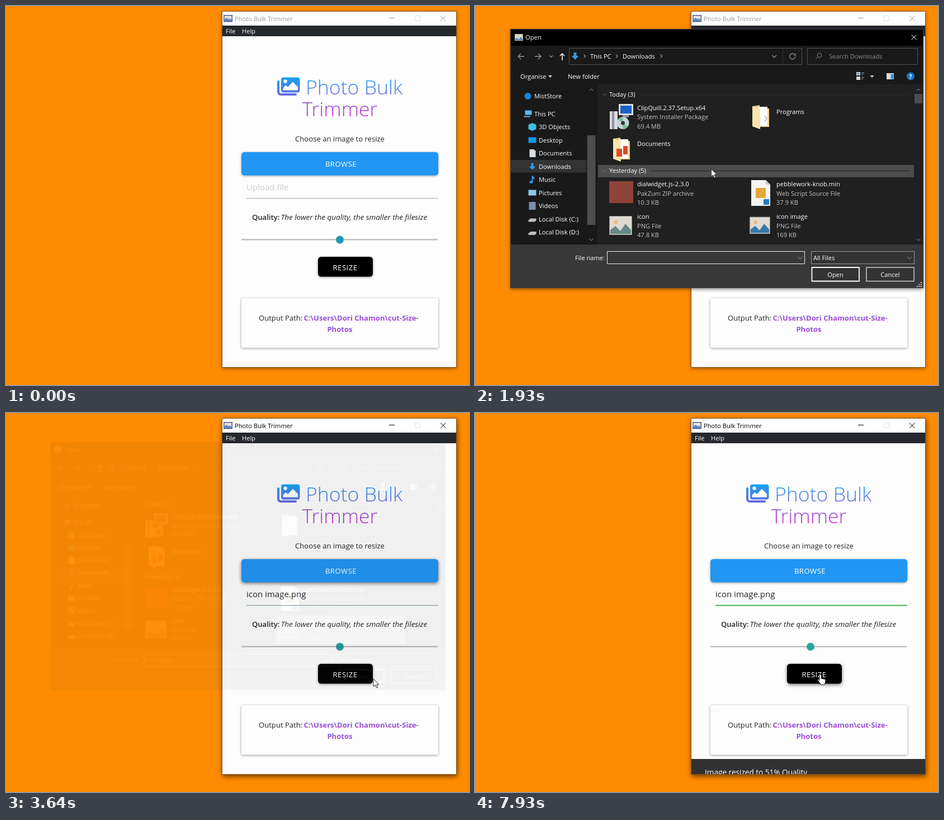
Write an HTML page that moves like this. It is 828 px wide and 677 px high and loops after 8 s.

```html
<!DOCTYPE html>
<html lang="en">
<head>
<meta charset="utf-8">
<title>Photo Bulk Trimmer</title>
<style>
html, body { margin: 0; width: 100%; height: 100%; overflow: hidden; background: #ff8c00; }
#stage { display: block; width: 828px; height: 677px; }
text { font: 11.1px "Open Sans", "Noto Sans", sans-serif; white-space: pre; }
.mid { text-anchor: middle; }
.head { font-size: 35.6px; font-weight: 300; fill: url(#titleInk); }
.body { font-size: 13.1px; fill: #212529; }
.field { font-size: 15px; }
.caps { font-size: 13.1px; letter-spacing: .5px; fill: #fff; }
.path { font-size: 13.1px; font-weight: 700; fill: url(#pathInk); }
.line { fill: none; }
.line:not([stroke]) { stroke: currentColor; }
.raised { filter: drop-shadow(0 1.5px 2px #0006); }
#dialog { transform-origin: 432.5px 272.5px; color: #ccc; }
#dialog text { fill: #fff; }
#dialog .dim { fill: #c4c4c4; }
#dialog .faint { fill: #8a8a8a; }
</style>
</head>
<body>
<svg id="stage" viewBox="0 0 828 677">
  <defs>
    <linearGradient id="titleInk" gradientUnits="userSpaceOnUse" x1="0" y1="126" x2="0" y2="200">
      <stop stop-color="#12a5f5"/><stop offset="1" stop-color="#d024c8"/>
    </linearGradient>
    <linearGradient id="pathInk" gradientUnits="userSpaceOnUse" x1="0" y1="546" x2="0" y2="566.5" spreadMethod="repeat">
      <stop stop-color="#4a8cea"/><stop offset="1" stop-color="#d020c8"/>
    </linearGradient>
    <g id="photo">
      <path fill="#8d8a85" d="M0 0h41v34H0z"/>
      <path fill="#dedad2" d="M1 1h39v32H1z"/>
      <circle cx="12" cy="11" r="3.500" fill="#eeb978"/>
      <path fill="currentColor" d="M2 32V25l9-7 9 9 9-13 10 11v7z"/>
    </g>
    <g id="folder">
      <path fill="#e6c77f" d="M0 2l13-2v40L0 37z"/>
      <path fill="#fff" d="M10 3h17v35H10z"/>
      <path fill="#fae4ae" d="M0 2l14 5v36L0 38z"/>
      <path fill="#f3d793" d="M27 6h3v33H14v-2h13z"/>
    </g>
  </defs>

  <rect width="828" height="677" fill="#ff8c00"/>

  <rect id="frame" x="386.500" y="9.500" width="419" height="636" fill="#fdfdfd" stroke="#8a5210"/>
  <path fill="#fff" d="M387 10h418v25H387z"/>
  <path fill="#25282d" d="M387 35h418v19H387z"/>
  <path fill="#4b5d8c" d="M389 16h16v12.500H389z"/>
  <path fill="#e8e2d6" d="M390.500 17.500h13v9.500h-13z"/>
  <path fill="#5b87c5" d="M390.500 27v-3l4-3 4 3 2-2 3 3v2z"/>
  <g id="caption">
    <text x="409" y="26.500" fill="currentColor">Photo Bulk Trimmer</text>
    <path class="line" d="M685 21.500h10M777 17.500l9.500 9.500m0-9.500l-9.500 9.500"/>
  </g>
  <path fill="none" stroke="#d5e3ec" d="M731.500 17.500h9v9h-9z"/>
  <text x="393" y="48.500" fill="#fff">File</text>
  <text x="422" y="48.500" fill="#fff">Help</text>

  <rect x="492" y="127.500" width="33.500" height="27" rx="4" fill="url(#titleInk)"/>
  <path fill="none" stroke="url(#titleInk)" stroke-width="4" stroke-linecap="round" d="M487 135v18q0 5 5 5h26"/>
  <circle cx="499.500" cy="134.500" r="3.200" fill="#fdfdfd"/>
  <path fill="#fdfdfd" d="M495.500 150.500v-4l5-5 3.500 3.500 9-9.500 9 9v6z"/>
  <text class="head" x="536" y="158">Photo Bulk</text>
  <text class="head mid" x="597" y="197">Trimmer</text>
  <text class="body mid" x="597" y="242">Choose an image to resize</text>

  <rect id="browse" class="raised" x="421" y="261" width="352" height="41.500" rx="5.500" fill="#2196f3"/>
  <text class="caps mid" x="599" y="287">BROWSE</text>
  <text id="hint" class="field" x="430" y="329" fill="#c9ccce">Upload file</text>
  <text id="chosen" class="field" x="430" y="329" fill="#212529">icon image.png</text>
  <path id="underline" d="M430 343.700h343"/>
  <text class="body" x="440" y="382" style="font-weight:600">Quality:</text>
  <text class="body" x="491.500" y="382" style="font-style:italic;font-size:13.500px">The lower the quality, the smaller the filesize</text>

  <path stroke="#c2c0c2" stroke-width="2.400" d="M421 417.300h351"/>
  <rect id="resize" class="raised" x="558" y="448" width="98" height="35.500" rx="5.500"/>
  <text class="caps mid" x="606.500" y="472">RESIZE</text>
  <g transform="translate(597 417.500)">
    <g id="slider">
      <circle id="thumb" r="7"/>
      <g transform="translate(0 -12)"><g id="bubble">
        <path fill="#26a69a" d="M0 0L-10.600-9.400A15 15 0 1 1 10.600-9.400Z"/>
        <text id="value" class="mid" y="-16" fill="#fff" style="font-size:9px">50</text>
      </g></g>
    </g>
  </g>

  <rect class="raised" x="421" y="522" width="352" height="88.500" rx="2" fill="#fdfdfd"/>
  <text class="body" x="452" y="562">Output Path: </text>
  <text class="path" x="532.500" y="562">C:\Users\Dori Chamon\cut-Size-</text>
  <text class="path mid" x="597" y="582">Photos</text>

  <g id="toast"><svg x="387" y="618" width="418" height="27">
    <rect width="418" height="27" fill="#323232"/>
    <text x="24" y="28.500" fill="#fff" style="font-size:13.600px">Image resized to 51% Quality</text>
  </svg></g>

  <g id="dialog">
    <rect x="63.500" y="41.500" width="738" height="462" fill="#191919" stroke="#3f3f3f" style="filter:drop-shadow(0 2px 3px #0007)"/>
    <path d="M64 42h737v29H64z"/>
    <path fill="#202020" d="M219 140h582v286H219z"/>
    <path fill="#383838" d="M64 426h737v77H64z"/>
    <use href="#photo" transform="translate(71 50) scale(.36)" color="#5b87a5"/>
    <text x="90" y="60">Open</text>
    <path class="line" stroke="#fff" d="M780.500 51.500l9 9m0-9l-9 9"/>
    <path class="line" stroke="#535353" d="M168.500 75.500h416v29h-416zM594.500 75.500h197v29h-197z"/>
    <path class="line" stroke="#333" d="M550.500 76v28"/>
    <path class="line" stroke="#999" stroke-width="1.300" d="M88 90H77m5-5l-5 5 5 5M107 90h11m-5-5l5 5-5 5"/>
    <path class="line" stroke="#999" stroke-width="1.200" d="M133 88.500l3 3 3-3M194.500 86.500l3 3-3 3M252 86.500l3 3-3 3M531 88l4 4 4-4M571.500 86.500a5 5 0 1 0 1.300 3.500m.2-5v3h-3"/>
    <path class="line" stroke="#fff" stroke-width="1.500" d="M156 97V85m-4 4l4-4 4 4"/>
    <path fill="#2f9be6" d="M176.500 83h5v6h4l-6.500 7-6.500-7h4z"/>
    <text x="206" y="94">This PC</text>
    <text x="264" y="94">Downloads</text>
    <circle class="line" stroke="#8a8a8a" cx="616" cy="88" r="3.800"/>
    <path stroke="#8a8a8a" d="M613 91l-4 4"/>
    <text class="faint" x="633" y="94">Search Downloads</text>
    <text x="81" y="130">Organise</text>
    <text x="166" y="130">New folder</text>
    <path fill="#ddd" d="M131 124h7l-3.500 4zM706.500 124h7l-3.500 4zM682 118h7v6h-7zM682 126h7v6h-7zM736 120h13v11h-13z"/>
    <path class="line" stroke="#aaa" d="M691 119.500h5m-5 3h3m-3 5h5m-5 3h3"/>
    <path fill="#3b8ed0" d="M743.500 121.500h5v9h-5zM683.500 119.500h4v3h-4z"/>
    <circle cx="779" cy="125.500" r="7" fill="#1676c8"/>
    <text class="mid" x="779" y="129.500" style="font-weight:700">?</text>
    <path fill="#4d4d4d" d="M200.500 231h15v160h-15z"/>
    <path class="line" stroke="#999" d="M204.500 151.500l3.500-3.500 3.500 3.500M204.500 415.500l3.500 3.500 3.500-3.500"/>
    <text id="working" class="mid" x="511" y="167">Working on it...</text>

    <g id="listing">
      <path class="line" stroke="#999" stroke-width="1.200" d="M331.500 86.500l3 3-3 3"/>
      <path fill="#333" d="M64 275h135v22.500H64z"/>
      <g id="places"></g>
      <path fill="#4d4d4d" d="M786 157h14v17h-14z"/>
      <path class="line" stroke="#999" d="M789.500 151.500l3.500-3.500 3.500 3.500M789.500 415.500l3.500 3.500 3.500-3.500"/>
      <path stroke="#2b2f2f" d="M295 158.500h483M314 294.500h464"/>
      <g id="overHeader"><path fill="#4d4d4d" d="M220 284h565v22H220z"/><path stroke="#222" d="M314 294.500h464"/></g>
      <path id="overArchive" fill="#4d4d4d" d="M235 307.500h245v54H235z"/>
      <path id="overImage" fill="#4d4d4d" d="M484 366h244v53H484z"/>
      <path id="picked" fill="#777" d="M484 366h244v53H484z"/>
      <path class="line" stroke="#777" d="M228 156.500l3.500 3.500 3.500-3.500M228 292.500l3.500 3.500 3.500-3.500"/>
      <text x="240" y="162">Today (3)</text>
      <text x="240" y="298">Yesterday (5)</text>

      <path fill="#d9dbe0" d="M257 175h26v20h-26zM241 188h14v32h-14z"/>
      <path fill="#1b62c4" d="M260 178h20v14h-20z"/>
      <path fill="#8d929b" d="M245 188h4v32h-4zM264 195h11v4h-11z"/>
      <circle cx="264.500" cy="209" r="11" fill="#c3d3d6"/>
      <path fill="#7dbb9a" d="M264.500 209l-9-6a11 11 0 0 1 9-5zM264.500 209l9 6a11 11 0 0 1-9 5z"/>
      <circle cx="264.500" cy="209" r="3.500" fill="#333"/>
      <use href="#folder" x="496" y="177"/>
      <path class="line" stroke="#777" d="M518 196l4 5-4 5"/>
      <use href="#folder" x="247" y="235"/>
      <path fill="#dc4a2c" d="M253 255h10v14h-10zM265 250h8v15h-8z"/>
      <path fill="#8f4238" d="M240 313h43v39h-43z"/>
      <path fill="#f5f5f5" d="M494 311h26l8 8v38h-34z"/>
      <path fill="#c8c8c8" d="M520 311l8 8h-8z"/>
      <path fill="#e5a73b" d="M502 325h18v18h-18z"/>
      <path fill="#1f7ec8" d="M516 345h10v10h-10z"/>
      <use href="#photo" x="240" y="375" color="#648a87"/>
      <use href="#photo" transform="translate(491 376.500) scale(.9)" color="#3a78a8"/>
      <g id="files"></g>
    </g>

    <text x="232" y="453.500" style="text-anchor:end">File name:</text>
    <path fill="#383838" stroke="#eee" d="M236.500 438.500h353v22h-353z"/>
    <path fill="#333" stroke="#999" d="M601.500 438.500h184v22h-184z"/>
    <path class="line" stroke="#aaa" d="M577.500 448l4 4 4-4M773 448l4 4 4-4"/>
    <text x="605" y="453.500">All Files</text>
    <path id="caret" stroke="#fff" d="M239.500 442v15"/>
    <text id="typed" x="239.500" y="453.500">icon image</text>
    <path fill="#333" stroke="#fff" stroke-width="1.800" d="M602.500 467h84.500v24.500h-84.500z"/>
    <path fill="#333" stroke="#ccc" stroke-width="1.500" d="M700 467h85v24.500h-85z"/>
    <text class="mid" x="644.500" y="483.500">Open</text>
    <text class="mid" x="742.500" y="483.500">Cancel</text>
    <path stroke="#ccc" stroke-width="2" stroke-dasharray="2 1.500" d="M790 501h10M793.500 497.500h6.500M797 494h3"/>
  </g>

  <g id="cursor">
    <circle id="press" r="12" fill="#ff0" fill-opacity=".62"/>
    <path id="arrow" fill="#fff" stroke="#111" stroke-width=".9" d="M0 0V14l3.300-3 2.200 5 2.300-1-2.200-4.900h4.500z"/>
    <path id="hand" fill="#fff" stroke="#111" stroke-width=".9" d="M-2 11V1.600a1.600 1.600 0 0 1 3.200 0V7l6 1.400q2 .6 1.800 2.600l-.8 4q-.4 1.500-1.400 3.200H.4q-1-2.200-3-4.600l-2.400-3.200q-.6-1.600 1-2 1 0 2 1.400z"/>
  </g>
</svg>
<script>
const LOOP = 8000, TICK = 70;
const el = id => document.getElementById(id);

// [icon colour, label, icon path centred on 0,0]
const places = [
  ['#1b84d8', 'MistStore', 'M-6 0a6 6 0 1 0 12 0a6 6 0 1 0-12 0z'],
  ['#5fb6ea', 'This PC', 'M-5-6H7V2H-5zM-7 4H4v2H-7z'],
  ['#3fc0e0', '3D Objects', 'M0-7L7-4V4L0 7-7 4V-4z'],
  ['#1296e8', 'Desktop', 'M-7-5H7V5H-7z'],
  ['#d5dce2', 'Documents', 'M-5-7H3L6-4V7H-5z'],
  ['#2f9be6', 'Downloads', 'M-2-6H2V0H6L0 6-6 0H-2z'],
  ['#2f9be6', 'Music', 'M0-7L4-3V0L1-2V4A3 2.500 0 1 1-1 2V-7z'],
  ['#8cc8ea', 'Pictures', 'M-7-5H7V5H-7z'],
  ['#7d8fa6', 'Videos', 'M-6-7H6V7H-6z'],
  ['#b9bfc4', 'Local Disk (C:)', 'M-7 2L-3-1H7V3L4 5H-7z'],
  ['#b9bfc4', 'Local Disk (D:)', 'M-7 2L-3-1H7V3L4 5H-7z']
];
el('places').innerHTML = places.map(([color, label, d], i) => {
  const x = i < 2 ? 106 : 114, y = i ? 192.500 + (i - 1) * 23.5 : 161;
  return `<path transform="translate(${x - 11.5} ${y})" fill="${color}" d="${d}"/>
    <text x="${x}" y="${y + 4}">${label}</text>`;
}).join('');

const files = [
  [290, 185.5, 'ClipQuill.2.37.Setup.x64', 'System Installer Package', '69.4 MB'],
  [539, 192.5, 'Programs'],
  [290, 250, 'Documents'],
  [290, 322, 'dialwidget.js-2.3.0', 'PakZum ZIP archive', '10.3 KB'],
  [539, 322, 'pebblework-knob.min', 'Web Script Source File', '37.9 KB'],
  [290, 380, 'icon', 'PNG File', '47.8 KB'],
  [539, 380, 'icon image', 'PNG File', '169 KB']
];
el('files').innerHTML = files.map(([x, y, ...rows]) => rows.map((row, i) =>
  `<text x="${x}" y="${y + i * 16.5}"${i ? ' class="dim"' : ''}>${row}</text>`).join('')).join('');

function play(id, prop, steps, move = false) {
  const frames = steps.map(([ms, value], i) => {
    const next = steps[i + 1]?.[0] ?? LOOP;
    const count = move ? Math.max(1, Math.round((next - ms) / TICK)) : 1;
    return { offset: ms / LOOP, [prop]: value, easing: `steps(${count})` };
  });
  frames.push({ offset: 1, [prop]: steps.at(-1)[1] });
  el(id).animate(frames, { duration: LOOP, iterations: Infinity });
}
// Alternates hidden and visible at the given times.
const show = (id, ...times) => play(id, 'opacity', [0, ...times].map((ms, i) => [ms, i % 2]));
const travel = (id, steps) => play(id, 'transform',
  steps.map(([ms, x, y]) => [ms, `translate(${x}px, ${y}px)`]), true);
const grow = (id, steps) => play(id, 'transform', steps.map(([ms, s]) => [ms, `scale(${s})`]), true);

const calm = 'drop-shadow(0 2px 3px #0006)', strong = 'drop-shadow(1px 3px 5px #0009)';
const focus = (off, on) => [[0, off], [1050, on], [1190, off], [3570, on]];
play('frame', 'filter', focus(calm, strong));
play('caption', 'color', focus('#999', '#000'));

const low = 'drop-shadow(0 1.5px 2px #0006)', high = 'drop-shadow(0 2.5px 3px #0008)';
play('browse', 'filter', [[0, low], [720, high], [3910, low]]);
play('resize', 'filter', [[0, low], [6460, high]]);

play('dialog', 'opacity', [[0, 0], [1460, .5], [1530, .85], [1600, 1], [3570, .45], [3640, .058], [3710, 0]]);
grow('dialog', [[0, .94], [1390, .94], [1460, .976], [1600, 1], [3500, 1], [3570, .975], [3640, .956], [3710, .94]]);
show('listing', 1600);
play('working', 'opacity', [[0, 1], [1600, 0]]);
show('overHeader', 1870, 2140);
show('overArchive', 2140, 2410);
show('overImage', 2620, 2820);
show('picked', 2820);
show('typed', 2820);
show('caret', 1460, 1600, 2820);

play('hint', 'opacity', [[0, 1], [3500, 0]]);
show('chosen', 3500);
play('underline', 'stroke', [[0, '#9e9e9e'], [3570, '#7f9c92'], [3640, '#6f9a8f'], [3710, '#4caf50']]);
play('underline', 'strokeWidth', [[0, '1px'], [3710, '2px']]);
play('thumb', 'fill', [[0, '#2097b5'], [3570, '#259a9b'], [3910, '#26a69a']]);

travel('slider', [[0, 0, 0], [4750, 0, 0], [5300, 41, 0], [5430, 41, 0], [5500, 31, 0], [5570, 20, 0], [5780, 3, 0]]);
grow('bubble', [[0, 0], [4680, 0], [4750, .35], [4960, 1], [6180, 1], [6250, .65], [6320, .25], [6390, 0]]);

travel('cursor', [
  [0, 640, 690], [170, 640, 690], [240, 636, 650], [720, 623, 298], [1460, 622.5, 299.5],
  [1930, 422.5, 291], [2210, 412, 314], [2480, 470, 372], [2750, 545, 401.5], [2820, 545, 401.5],
  [3090, 652, 474], [3570, 657, 475], [3910, 657, 474], [4680, 597, 418], [4750, 597, 418],
  [5300, 637, 418], [5430, 637, 418], [5500, 627, 418], [5570, 616, 418], [5780, 600, 418],
  [6180, 600, 418], [6520, 618, 467]
]);
show('press', 1050, 1190, 2820, 2890, 4750, 6250, 6850, 6920);
show('hand', 720, 1460, 4200);
play('arrow', 'opacity', [[0, 1], [720, 0], [1460, 1], [4200, 0]]);
show('toast', 7930);

function label() {
  const shift = new DOMMatrix(getComputedStyle(el('slider')).transform).e;
  el('value').textContent = Math.round(50 + shift / 3.4);
  requestAnimationFrame(label);
}
label();
</script>
</body>
</html>
```
